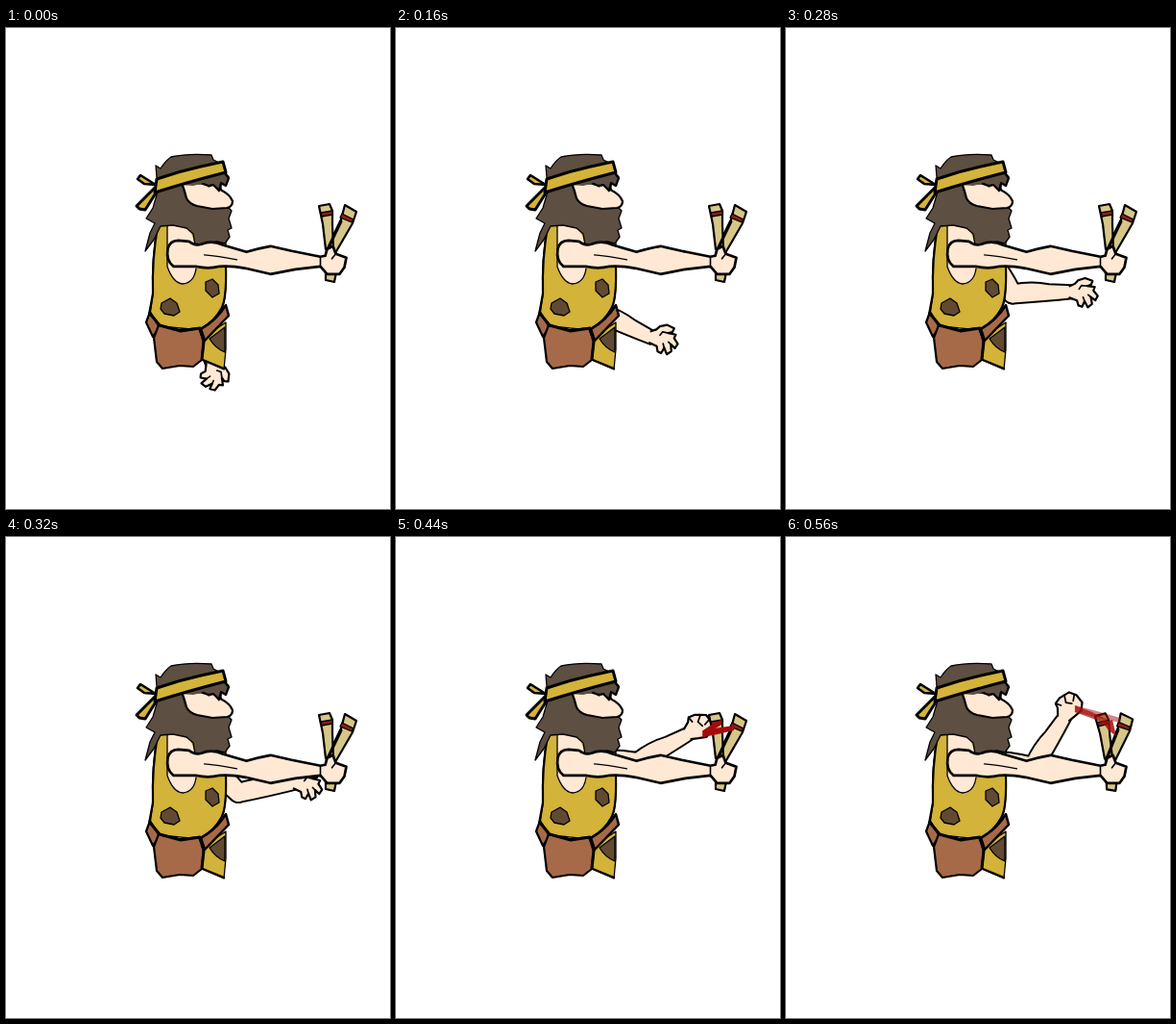
An HTML page that plays this animation: 400 px wide and 500 px high, repeating every 600 ms.

```html
<!DOCTYPE html>
<html lang="en">
<head>
<meta charset="utf-8">
<title>Slingshot</title>
<style>
  html, body { margin: 0; width: 100%; height: 100%; overflow: hidden; background: #fff; }
  svg { display: block; width: 100vw; height: 100vh; }
  path { stroke-linejoin: round; stroke-linecap: round; }
  .ink { stroke: #000; stroke-width: 3; }
  .mid { stroke: #000; stroke-width: 2.2; }
  .thin { stroke: #000; stroke-width: 1.3; }
  .skin { fill: #ffe8d4; }
  .gold { fill: #d3b339; }
  .hair { fill: #5d4f42; }
  .belt { fill: #a66a48; }
  .spot { fill: #614a31; }
  .wood { fill: #d6c688; }
  .line { fill: none; }
  .wrap { fill: #8a1f18; }
</style>
</head>
<body>
<svg viewBox="0 0 400 500">
  <!-- far arm -->
  <g id="armInk" class="skin" stroke="#000" stroke-width="4"></g>
  <g id="armFill" class="skin"></g>
  <path id="hand" class="skin mid"/>
  <path id="knuckles" class="line mid" style="stroke-width:1.7"/>

  <!-- tunic -->
  <path class="gold thin" d="M205 322 L229 306 L229 334 L227 355 L204 345Z"/>
  <path class="spot thin" d="M212 323 L228 311 L228 337 Q218 333 212 323Z"/>
  <path class="line mid" d="M205 345 L227 354"/>
  <path class="gold thin" d="M158 205 L200 205 L229 222 L229 262 Q229 283 225 291 Q217 306 203 314 L160 310 L150 298 L153 278 Q151 240 158 205Z"/>
  <path class="line mid" d="M158 206 Q152 240 153 276 L149 298 M229 248 Q230 283 224 292 Q217 305 204 312"/>
  <path class="skin" d="M168 205 L190 207 L198 226 L198 252 Q196 266 184 266 Q173 264 168 248Z"/>
  <path class="line thin" d="M168 206 L168 248 Q174 265 184 266 Q196 265 198 250"/>
  <path class="spot thin" d="M162 286 L171 281 L178 286 L181 295 L175 299 L165 297 L161 292Z"/>
  <path class="spot thin" d="M208 264 L215 261 L221 267 L222 276 L215 280 L208 273Z"/>

  <!-- belt and pouch -->
  <path class="belt mid" d="M150 295 L146 306 L153 321 L160 311Z"/>
  <path class="belt ink" style="stroke-width:2.5" d="M203 313 Q220 303 229 288 L232 299 L207 325Z"/>
  <path class="belt mid" d="M159 309 L180 314 L201 312 L206 325 L204 345 L195 352 L181 351 L163 354 L157 347 L154 322Z"/>
  <path class="line ink" d="M150 297 L160 309 L182 315 L202 312 L206 326 L204 344"/>

  <!-- head -->
  <path class="hair thin" d="M157 155 L156 143 L161 146 Q167 137 172 134 Q190 130 214 132 L216 137 L226 142 L229 151 L232 155 L229 163 L224 162 L224 168 L230 185 L235 190 L232 198 L235 208 L231 210 L233 217 L228 224 L220 222 L197 226 L195 214 L188 208 L174 205 L161 206 L154 220 L145 232 L150 213 L155 203 L146 198 L153 187 L158 170Z"/>
  <path class="skin mid" d="M183 161 Q186 169 188 177 Q191 183 199 185 L215 188 L230 187 Q236 186 236 180 Q233 173 225 169 L215 162Z"/>
  <path class="hair" d="M181 163 L214 154 L231 152 L231 157 L228 164 L224 161 L222 171 L216 164 L211 166 L207 161 L195 164Z"/>
  <path class="line mid" d="M205 162 L211 164 L216 163 L222 169 L224 161 L229 164 L232 156 L228 151"/>
  <path class="gold ink" style="stroke-width:2.6" d="M156 163 L140 153 L137 157 L144 162Z"/>
  <path class="gold ink" d="M155 166 L136 185 L139 188 L145 189 L157 170Z"/>
  <path class="gold ink" d="M157 157 Q180 149 203 144 L226 139 L229 150 Q190 160 155 171Z"/>

  <!-- slingshot -->
  <g id="fork">
    <path class="wood mid" d="M333 254 L333 262 L342 264 L344 254 L343 230 L334 230Z"/>
    <path class="wood mid" d="M353 184 L365 191 L361 203 L343 234 L334 230 L349 199Z"/>
    <path class="wood mid" d="M326 185 L337 183 L340 190 L340 205 L341 230 L333 230 L330 204Z"/>
    <path class="wrap thin" d="M328 192 L340 190 L340 194 L329 196Z M350 193 L362 199 L360 202 L348 197Z"/>
    <path class="line ink" d="M349 201 L335 230"/>
  </g>
  <g id="band" fill="#a30c0c">
    <path id="bandR"/>
    <path id="bandL"/>
    <path id="drip" d="M330 193 L340 190 L344 207 L336 201Z"/>
  </g>

  <!-- near arm -->
  <g transform="translate(0.5 0.8)">
    <path class="skin ink" style="stroke-width:2.7" d="M168 229 Q170 220 179 220 L190 221 Q196 226 203 224 Q214 219 226 225 L250 232 Q263 228 275 226 L297 231 L327 237 L332 236 L334 229 L340 226 L343 234 L354 238 L352 248 L347 255 L334 255 L327 247 L301 250 L275 255 L249 249 Q233 246 222 247 Q210 250 197 247 L174 247 Q166 241 168 229Z"/>
    <path class="line thin" d="M206 235 Q220 236 240 240"/>
    <path class="line mid" style="stroke-width:1.6" d="M343 234 L339 239 M327 238 L327 246"/>
  </g>
</svg>
<script>
const LOOP = 600, STEP = 40, FORE = 60;
const SHOULDER = [206, 234];
const GRAB = 11;

// step, elbow x, elbow y, forearm angle, hand angle
const POSES = [
  [0, 198, 290, 74, 82],
  [2, 198, 296, 52, 32],
  [4, 211, 296, 25, 12],
  [6, 230, 287, 6, 0],
  [8, 242, 266, -10, 12],
  [11, 252, 234, -29, -30],
  [14, 258, 239, -58, -62]
];

const OPEN = 'M-1 -6 L4 -9 L7 -13 L14 -16 L22 -14 L21 -10 L17 -8 L25 -8 L24 -4 L29 1 L27 6 L22 3 L24 10 L20 14 L16 8 L14 14 L10 13 L8 8 L0 6';
const OPEN_LINES = 'M17 -8 L11 -8 L9 -4 M22 3 L19 1 M16 8 L14 4';
const FIST = 'M-1 -7 L6 -11 L9 -15 L16 -14 L21 -11 L26 -8 L27 0 L23 9 L15 12 L7 9 L0 6';
const FIST_LINES = 'M21 -11 L15 -6 L17 0 M26 -2 L20 0 M9 -15 L10 -9';
const FORE_PATH = 'M0 -9 Q20 -12 38 -8 L62 -6 L62 6 Q34 8 0 9 A9 9 0 0 1 0 -9Z';

const $ = id => document.getElementById(id);
const NS = 'http://www.w3.org/2000/svg';
const set = (el, attrs) => { for (const k in attrs) el.setAttribute(k, attrs[k]); };

function addPath(parent) {
  return parent.appendChild(document.createElementNS(NS, 'path'));
}

// Inked copy below, plain copy above: the joint shows no seam
const limbs = ['armInk', 'armFill'].map(id => ({ upper: addPath($(id)), fore: addPath($(id)) }));

function poseAt(step) {
  let i = 0;
  while (i < POSES.length - 2 && step >= POSES[i + 1][0]) i++;
  const a = POSES[i], b = POSES[i + 1];
  const k = (step - a[0]) / (b[0] - a[0]);
  return a.map((v, n) => v + (b[n] - v) * k);
}

const place = (x, y, deg) => `translate(${x} ${y}) rotate(${deg})`;
const polar = (x, y, deg, r) => {
  const a = deg * Math.PI / 180;
  return [x + r * Math.cos(a), y + r * Math.sin(a)];
};

function strip([x, y], x1, y1, x2, y2, sag) {
  const mx = (x + x1) / 2, my = (y + y1) / 2 + sag;
  return `M${x} ${y - 3} Q${mx} ${my - 3} ${x1} ${y1} L${x2} ${y2} Q${mx} ${my + 4} ${x} ${y + 4}Z`;
}

function draw(step) {
  const [, ex, ey, foreDeg, handDeg] = poseAt(step);
  const [sx, sy] = SHOULDER;
  const len = Math.hypot(ex - sx, ey - sy);
  const upDeg = Math.atan2(ey - sy, ex - sx) * 180 / Math.PI;
  const [wx, wy] = polar(ex, ey, foreDeg, FORE);

  for (const limb of limbs) {
    set(limb.upper, {
      d: `M0 -11 Q${len / 2} -13 ${len} -9 A9 9 0 0 1 ${len} 9 L0 9Z`,
      transform: place(sx, sy, upDeg)
    });
    set(limb.fore, { d: FORE_PATH, transform: place(ex, ey, foreDeg) });
  }

  const held = step >= GRAB;
  const at = place(wx, wy, handDeg);
  set($('hand'), { d: held ? FIST : OPEN, transform: at });
  set($('knuckles'), { d: held ? FIST_LINES : OPEN_LINES, transform: at });

  const pull = held ? (step - GRAB) / 3 : 0;
  set($('fork'), { transform: `rotate(${-4 * pull} 340 245)` });
  $('band').style.display = held ? '' : 'none';
  if (held) {
    const grip = polar(wx, wy, handDeg + 27 - 7 * pull, 15);
    const s = -4 * pull;
    set($('bandL'), { d: strip(grip, 339 + s, 190, 339 + s, 195, 0), opacity: 1 - 0.3 * pull });
    set($('bandR'), { d: strip(grip, 352 + s, 196 - 8 * pull, 352 + s, 201 - 8 * pull, 1), opacity: 1 - 0.5 * pull });
    set($('drip'), { opacity: 0.85 * pull });
  }
}

let last = -1;
function tick(now) {
  const step = Math.floor((now % LOOP) / STEP);
  if (step !== last) draw(last = step);
  requestAnimationFrame(tick);
}
draw(0);
requestAnimationFrame(tick);
</script>
</body>
</html>
```
